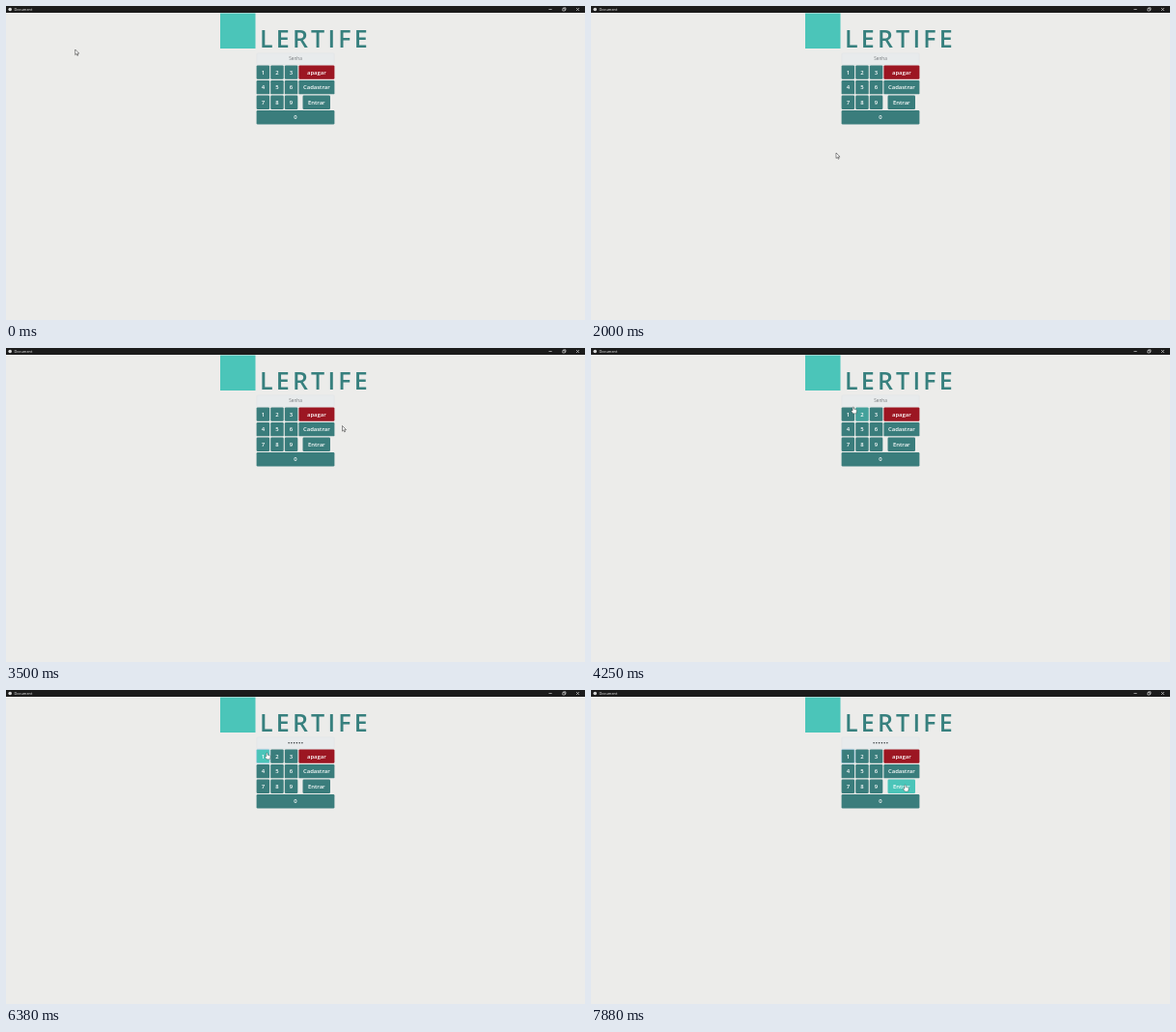
An HTML page for the animation above (8000 ms loop, 600 by 325 pixels).

```html
<!DOCTYPE html>
<html lang="pt">
<head>
<meta charset="utf-8">
<title>Document</title>
<style>
  html, body { margin: 0; width: 100%; height: 100%; overflow: hidden; background: #ececea; }
  svg { display: block; width: 100%; height: 100%; }
  text { font-family: "Open Sans", "Noto Sans", sans-serif; }
  .key { font-size: 5.9px; font-weight: 600; fill: #fff; text-anchor: middle; }
</style>
</head>
<body>
<svg viewBox="0 0 600 325">
  <rect width="600" height="325" fill="#ececea"/>
  <rect width="600" height="7" fill="#1b1b1b"/>
  <circle cx="4.2" cy="3.5" r="1.8" fill="#d8d8d8"/>
  <text x="8.4" y="4.9" font-size="3.9" fill="#f2f2f2">Document</text>
  <g fill="none" stroke="#e4e4e4" stroke-width=".6">
    <path d="M562.5 3.5h3.2M591 2l3 3m0-3l-3 3"/>
    <path d="M576.8 2.6h2.4v2.4h-2.4zM577.6 2.6v-.8h2.4v2.4h-.8"/>
  </g>

  <rect x="222" y="7.5" width="36.5" height="36.5" fill="#4bc5b9"/>
  <text x="263" y="43" font-size="25" font-weight="600" letter-spacing="3.2" fill="#37807e">LERTIFE</text>

  <rect x="259.8" y="48.8" width="80.4" height="12" rx="1" fill="#e8ebec" stroke="#dde1e4" stroke-width=".4"/>
  <text id="hint" x="300" y="56.3" font-size="4.7" text-anchor="middle" fill="#74797c">Senha</text>
  <g id="dots" fill="#303638"></g>
  <g id="keys"></g>

  <g id="cursor">
    <path id="arrow" d="M0 0V5.6L1.3 4.4L2.2 6.4L3.1 6L2.2 4.1H4Z"
      fill="#fff" stroke="#222" stroke-width=".5" stroke-linejoin="round"/>
    <path id="hand" d="M-.7 .4Q0-.4 .7 .4V2.2L3 2.8Q3.7 3 3.6 4L3 6.8H-.3L-2.1 4.2Q-1.9 3.2-.7 4Z"
      fill="#fff" stroke="#222" stroke-width=".35" stroke-linejoin="round"/>
  </g>
</svg>
<script>
const LOOP = 8000, STEP = 125, FADE = 90;
const IDLE = [58, 125, 124], LIT = [75, 197, 185], RED = [156, 22, 34];
const $ = id => document.getElementById(id);

function add(parent, tag, attrs) {
  const el = document.createElementNS("http://www.w3.org/2000/svg", tag);
  for (const name in attrs) el.setAttribute(name, attrs[name]);
  parent.append(el);
  return el;
}

const keys = [];
function addKey(label, row, x, w, color = IDLE) {
  const y = 61.4 + 15.55 * row, h = 14.4;
  const box = add($("keys"), "rect", { x, y, width: w, height: h, rx: 1.2 });
  const text = add($("keys"), "text", { x: x + w / 2, y: y + h / 2 + 2.1, class: "key" });
  text.textContent = label;
  keys.push({ x, y, w, h, color, box });
}

for (let i = 0; i < 9; i++) addKey(i + 1, Math.floor(i / 3), 259.6 + 14.6 * (i % 3), 13.5);
addKey("apagar", 0, 303.4, 37, RED);
addKey("Cadastrar", 1, 303.4, 37);
addKey("Entrar", 2, 307.5, 28.5);
addKey("0", 3, 259.6, 80.8);

// pointer strokes: each runs from where the previous one ended
const smooth = f => f * f * (3 - 2 * f);
const easeOut = f => 1 - (1 - f) ** 3;
const origin = { x: 71.7, y: 45 };
const strokes = [
  { from: 500, to: 1375, x: 254, y: 152, ease: smooth },
  { from: 2500, to: 3000, x: 431, y: 154, ease: easeOut },
  { from: 3000, to: 3500, x: 348.5, y: 80.5, ease: smooth },
  { from: 3500, to: 4250, x: 271.8, y: 61, ease: smooth },
  { from: 4250, to: 4375, x: 270.4, y: 65, ease: smooth },
  { from: 7375, to: 7750, x: 325.6, y: 98.2, ease: smooth }
];

function pointer(t) {
  let { x, y } = origin;
  for (const s of strokes) {
    const f = s.ease(Math.min(1, Math.max(0, (t - s.from) / (s.to - s.from))));
    x += (s.x - x) * f;
    y += (s.y - y) * f;
  }
  return { x, y };
}

const over = (k, p) => p.x >= k.x && p.x <= k.x + k.w && p.y >= k.y && p.y <= k.y + k.h;
const mix = (a, b, f) => `rgb(${a.map((v, i) => Math.round(v + (b[i] - v) * f))})`;
const show = (el, on) => { el.style.display = on ? "" : "none"; };

// one digit every PACE ms
const DIGITS = 6, FIRST = 5125, PACE = 250;
const typed = t => Math.min(DIGITS, Math.max(0, Math.floor((t - FIRST) / PACE) + 1));
const dots = Array.from({ length: DIGITS }, () => add($("dots"), "circle", { cy: 54.8, r: .78 }));

function draw(time) {
  const t = Math.floor((time % LOOP) / STEP) * STEP;
  const now = pointer(t), before = pointer(t - FADE);
  let hot = false;

  for (const k of keys) {
    const glow = (over(k, now) + over(k, before)) / 2;
    hot = hot || glow > 0;
    k.box.setAttribute("fill", mix(k.color, LIT, glow));
  }

  const count = typed(t);
  show($("hint"), !count);
  dots.forEach((dot, i) => {
    show(dot, i < count);
    dot.setAttribute("cx", 300 + (i - (count - 1) / 2) * 2.75);
  });

  // focus ring on the pressed key
  keys[0].box.setAttribute("stroke", count ? "#a9cfe6" : "none");
  keys[0].box.setAttribute("stroke-width", .7);

  show($("arrow"), !hot);
  show($("hand"), hot);
  $("cursor").setAttribute("transform", `translate(${now.x} ${now.y})`);
}

const start = performance.now();
function tick() {
  draw(performance.now() - start);
  requestAnimationFrame(tick);
}
tick();
</script>
</body>
</html>
```
